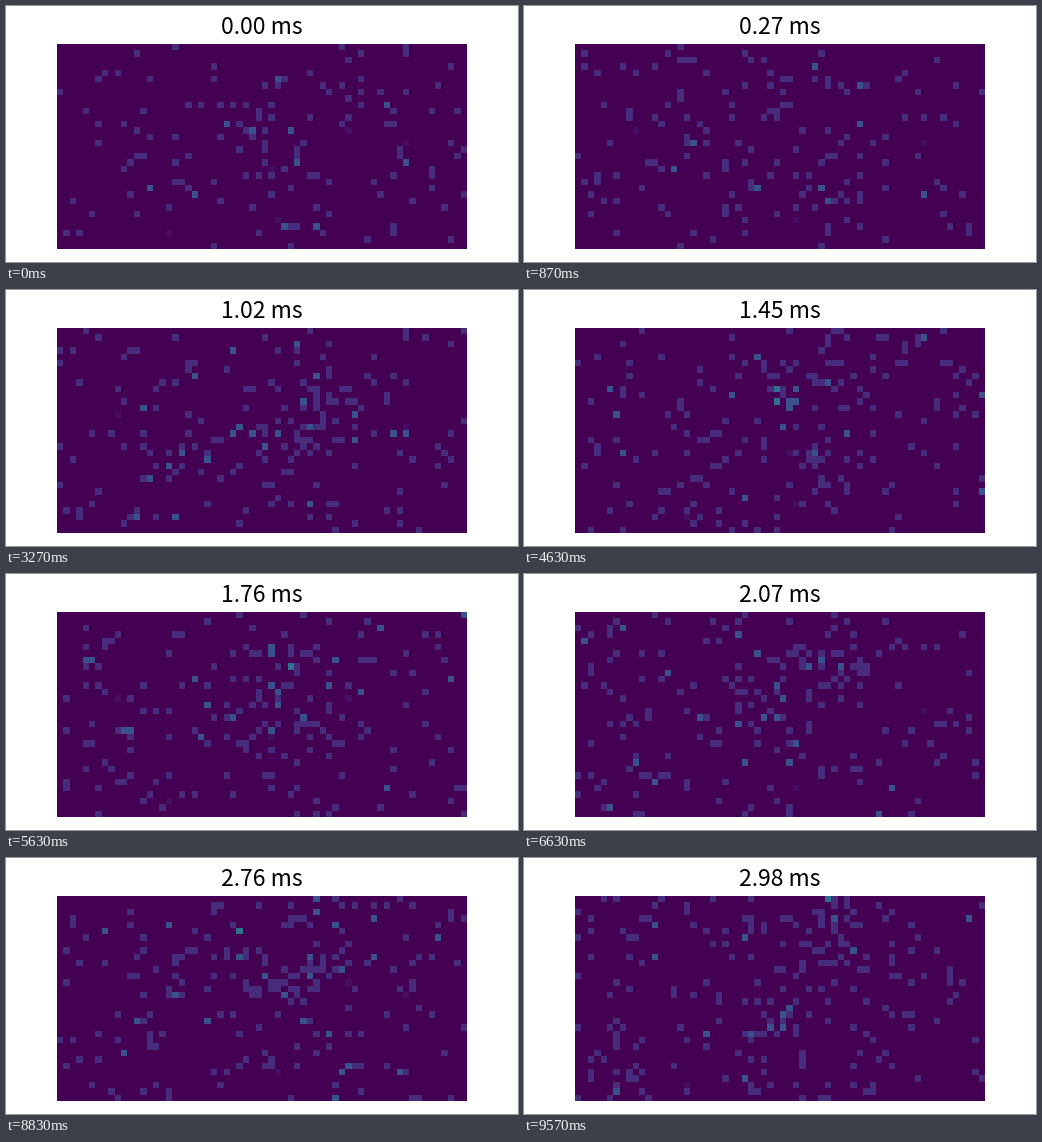
Recreate the animation shown at these times as a matplotlib script. Size 512 px wide and 256 px high, loop 9600 ms.

```python
import numpy as np
import matplotlib.pyplot as plt
from matplotlib.animation import FuncAnimation

WIDTH, HEIGHT, DPI = 512, 256, 100
COLS, ROWS = 64, 32
LOOP_MS, TICK_MS = 9600, 20
EXPOSURES = 288
STEP_MS = 0.0104          # sensor time between two exposures
MAX_COUNT = 8
FAULTY = [(9, 13), (45, 13), (54, 15), (33, 19), (34, 27), (17, 29)]

xx, yy = np.meshgrid(np.arange(COLS), np.arange(ROWS))


def spot(col, row, width, strength):
    """Soft round light on the sensor."""
    dist2 = (xx - col) ** 2 + (yy - row) ** 2
    return strength * np.exp(-dist2 / (2 * width**2))


def mean_counts(u):
    """Expected counts per cell at loop position u (0 to 1)."""
    swing = np.cos(2 * np.pi * 2.9 * u)
    rate = 0.066 - 0.02 * xx / COLS
    rate = rate + spot(34, 12, 9, 0.05)
    rate += spot(32, 9 + 6 * u + 4 * swing, 2.8, 0.23)
    rate += spot(40 + 8 * np.exp(-8 * u), 8, 2.8, 0.20)
    rate += spot(39, 25 - 16 * u - 9 * u * swing, 2.8, 0.20)
    rate += spot(20 - 10 * u, 17 + 9 * u, 4, 0.10)
    return rate * (0.9 + 0.35 * u)


def exposure(n):
    rng = np.random.default_rng(4100 + n)
    counts = rng.poisson(mean_counts(n / EXPOSURES)).astype(float)
    # A few hits trigger an extra count
    counts += (counts > 0) & (rng.random(counts.shape) < 0.04)
    for col, row in FAULTY:
        counts[row, col] = rng.choice([0, 0.3])
    return counts


fig = plt.figure(figsize=(WIDTH / DPI, HEIGHT / DPI), dpi=DPI, facecolor="white")
ax = fig.add_axes([0.1, 0.05, 0.8, 0.8])
ax.axis("off")
image = ax.imshow(exposure(0), cmap="viridis", vmin=0, vmax=MAX_COUNT,
                  interpolation="nearest", aspect="auto")
title = fig.text(0.5, 1 - 28 / HEIGHT, "0.00 ms", ha="center", va="baseline",
                 family="Noto Sans CJK JP", fontsize=23 * 72 / DPI, color="black")


def draw(tick):
    # Latest exposure begun by the middle of this tick, rounded to 10 ms
    n = int((tick * TICK_MS + 14) * EXPOSURES / LOOP_MS)
    image.set_data(exposure(n))
    title.set_text(f"{n * STEP_MS:.2f} ms")
    return image, title


anim = FuncAnimation(fig, draw, frames=LOOP_MS // TICK_MS, interval=TICK_MS,
                     repeat=True, repeat_delay=0)
plt.show()
```
